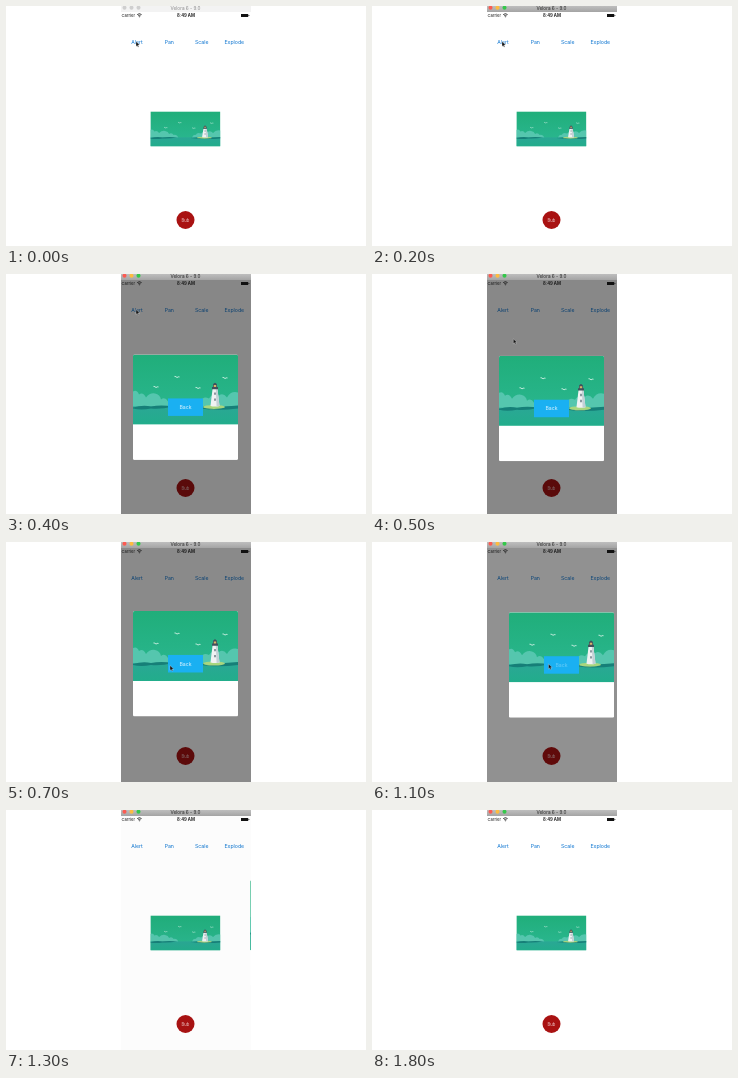
Animation of 360 by 240 pixels, one loop 2000 ms. Source, as an HTML page:

```html
<!DOCTYPE html>
<html lang="en">
<head>
<meta charset="utf-8">
<title>Alert demo</title>
<style>
html, body { margin: 0; width: 100%; height: 100%; overflow: hidden; background: #fff; }
svg { display: block; width: 100vw; height: 100vh; }
text { font-family: Inter, "Liberation Sans", sans-serif; text-anchor: middle; }
</style>
</head>
<body>
<svg viewBox="0 0 360 240" xmlns="http://www.w3.org/2000/svg">
  <defs>
    <linearGradient id="sky" x1="0" y1="0" x2="0" y2="1">
      <stop offset="0" stop-color="#20ae7a"/>
      <stop offset="1" stop-color="#2cb893"/>
    </linearGradient>
    <linearGradient id="sea" x1="0" y1="0" x2="0" y2="1">
      <stop offset="0" stop-color="#2aa795"/>
      <stop offset="1" stop-color="#22ad8b"/>
    </linearGradient>
    <linearGradient id="metal" x1="0" y1="0" x2="0" y2="1">
      <stop offset="0" stop-color="#bebebe"/>
      <stop offset="1" stop-color="#a4a4a4"/>
    </linearGradient>
    <clipPath id="screen"><rect x="115" y="6" width="130" height="234"/></clipPath>
    <clipPath id="frame"><rect width="105" height="70"/></clipPath>
    <clipPath id="round"><rect width="105" height="105.5" rx="1.5"/></clipPath>
    <g id="scene" clip-path="url(#frame)">
      <rect width="105" height="70" fill="url(#sky)"/>
      <g fill="#55c6ae">
        <path d="M0 53V37Q4 35 6 40Q10 37 13 43Q17 38 22 39Q27 40 28 45Q32 42 35 47Q40 46 42 53Z"/>
        <path d="M62 53Q64 46 68 47Q70 41 76 44Q80 38 86 41Q90 38 94 43Q98 36 105 38V53Z"/>
      </g>
      <rect y="52" width="105" height="18" fill="url(#sea)"/>
      <g fill="#167f78">
        <path d="M0 53Q10 50 18 52Q28 50 40 52Q28 55 18 54Q8 56 0 54Z"/>
        <path d="M60 53Q70 51 78 53Q92 52 105 51V54Q90 56 76 55Z"/>
      </g>
      <ellipse cx="81" cy="52.5" rx="11" ry="2" fill="#a9d67e"/>
      <path d="M72 53.5Q82 56 91 53Q85 55.5 78 55Z" fill="#5fa880"/>
      <path d="M79.6 34H84.4L86.5 51.5Q82 52.5 77.5 51.5Z" fill="#f0f2f3"/>
      <path d="M82.8 34H84.4L86.5 51.5L83.6 52Z" fill="#c3d0d6"/>
      <path d="M79 34V32.5H80V30Q82 26.5 84 30V32.5H85V34.8H79Z" fill="#41505c"/>
      <path d="M80.8 30.5H83.2V32.5H80.8Z" fill="#d9b36a"/>
      <path d="M81.3 38h1.4v2.4h-1.4zM81.3 44h1.4v2.4h-1.4z" fill="#62727e"/>
      <g id="birds" fill="none" stroke="#eafaf3" stroke-width=".8"/>
    </g>
  </defs>

  <rect width="360" height="240" fill="#fff"/>
  <g clip-path="url(#screen)">
    <g id="nav" font-size="5.2" fill="#0872d0"></g>
    <use href="#scene" transform="translate(144.4 105.4) scale(.6667 .5)"/>
    <circle cx="179.5" cy="214" r="9" fill="#a91212"/>
    <text x="179.5" y="215.6" font-size="4.2" fill="#f0cccc">Bub</text>
    <rect id="shade" x="115" y="6" width="130" height="234" fill="#000"/>
    <g id="card">
      <g clip-path="url(#round)">
        <rect width="105" height="105.5" fill="#fff"/>
        <use href="#scene"/>
        <rect x="35" y="44" width="35" height="17.5" fill="#1ab0f2"/>
        <text id="back" x="52.5" y="54.7" font-size="5.2" fill="#e2f5ff">Back</text>
      </g>
    </g>
    <text x="122.3" y="11" font-size="4.1" fill="#111">Carrier</text>
    <g fill="none" stroke="#111" stroke-width=".8">
      <path d="M131.2 8.6Q133.4 6.8 135.6 8.6M132.2 9.8Q133.4 8.8 134.6 9.8"/>
    </g>
    <circle cx="133.4" cy="10.7" r=".5" fill="#111"/>
    <text x="180" y="11" font-size="4.3" font-weight="600" fill="#111">8:49 AM</text>
    <path d="M235 8h7.2v3h-7.2zM242.6 8.9h.7v1.2h-.7z" fill="#111"/>
  </g>
  <rect id="bar" x="115" y="0" width="130" height="6"/>
  <g id="dots"></g>
  <text id="title" x="179.5" y="3.8" font-size="4.7">Velora 6 - 9.0</text>
  <path id="cursor" d="M0 0V5L1.2 3.9L2 5.7L2.8 5.3L2.1 3.6H3.7Z" fill="#111" stroke="#fff" stroke-width=".3"/>
</svg>
<script>
const $ = id => document.getElementById(id);
const LOOP = 2000, STEP = 100, LAST = 1800;
const LIGHTS = ['#fc5b52', '#fdbc40', '#34c84a'];

$('nav').innerHTML = [['Alert', 131], ['Pan', 163.3], ['Scale', 195.8], ['Explode', 228.3]]
  .map(([label, x]) => `<text x="${x}" y="37.6">${label}</text>`).join('');
$('birds').innerHTML = [[44, 23], [23, 33], [65, 34], [92, 24]]
  .map(([x, y]) => `<path d="M${x - 2.5} ${y - 1}q1.7 -.2 2.5 1.2q1 -1.2 2.5 -.7"/>`).join('');
$('dots').innerHTML = LIGHTS.map((c, i) => `<circle cx="${118.5 + 7 * i}" cy="1.7" r="2"/>`).join('');

// Linear interpolation through [time, value] pairs
function track(keys, t) {
  if (t <= keys[0][0]) return keys[0][1];
  for (let i = 1; i < keys.length; i++) {
    const [a, from] = keys[i - 1], [b, to] = keys[i];
    if (t <= b) return from + (to - from) * (t - a) / (b - a);
  }
  return keys[keys.length - 1][1];
}

// Remaining distance of an underdamped spring, from 1 to 0
function spring(s) {
  const k = 10.4, w = 12.85;
  return Math.exp(-k * s) * (Math.cos(w * s) + k / w * Math.sin(w * s));
}

const shadeKeys = [[200, 0], [300, .27], [400, .47], [700, .46], [1000, .46], [1100, .43], [1200, .22], [1300, .01], [1400, 0]];
const cursorX = [[400, 130], [700, 164], [1000, 176.5]];
const cursorY = [[400, 35.5], [700, 123.5], [1000, 122]];

function draw(t) {
  const active = t >= 100;
  $('bar').setAttribute('fill', active ? 'url(#metal)' : '#f3f3f3');
  $('title').setAttribute('fill', active ? '#222' : '#888');
  [...$('dots').children].forEach((dot, i) => dot.setAttribute('fill', active ? LIGHTS[i] : '#cfcfcf'));

  $('shade').setAttribute('opacity', track(shadeKeys, t));

  const y = 70.2 - 203 * spring(Math.max(0, t - 200) / 1000);
  const x = 127 + 10 * Math.pow(Math.max(0, t - 1000) / 100, 2.24);
  $('card').setAttribute('transform', `translate(${x} ${y})`);
  $('card').setAttribute('visibility', t >= 200 && t < 1400 ? 'visible' : 'hidden');
  $('back').setAttribute('opacity', t >= 1000 ? .4 : 1);

  $('cursor').setAttribute('transform', `translate(${track(cursorX, t)} ${track(cursorY, t)})`);
  $('cursor').setAttribute('visibility', t < 1300 ? 'visible' : 'hidden');
}

const start = performance.now();
function tick() {
  const t = (performance.now() - start) % LOOP;
  draw(Math.min(LAST, Math.floor(t / STEP) * STEP));
  requestAnimationFrame(tick);
}
tick();
</script>
</body>
</html>
```
